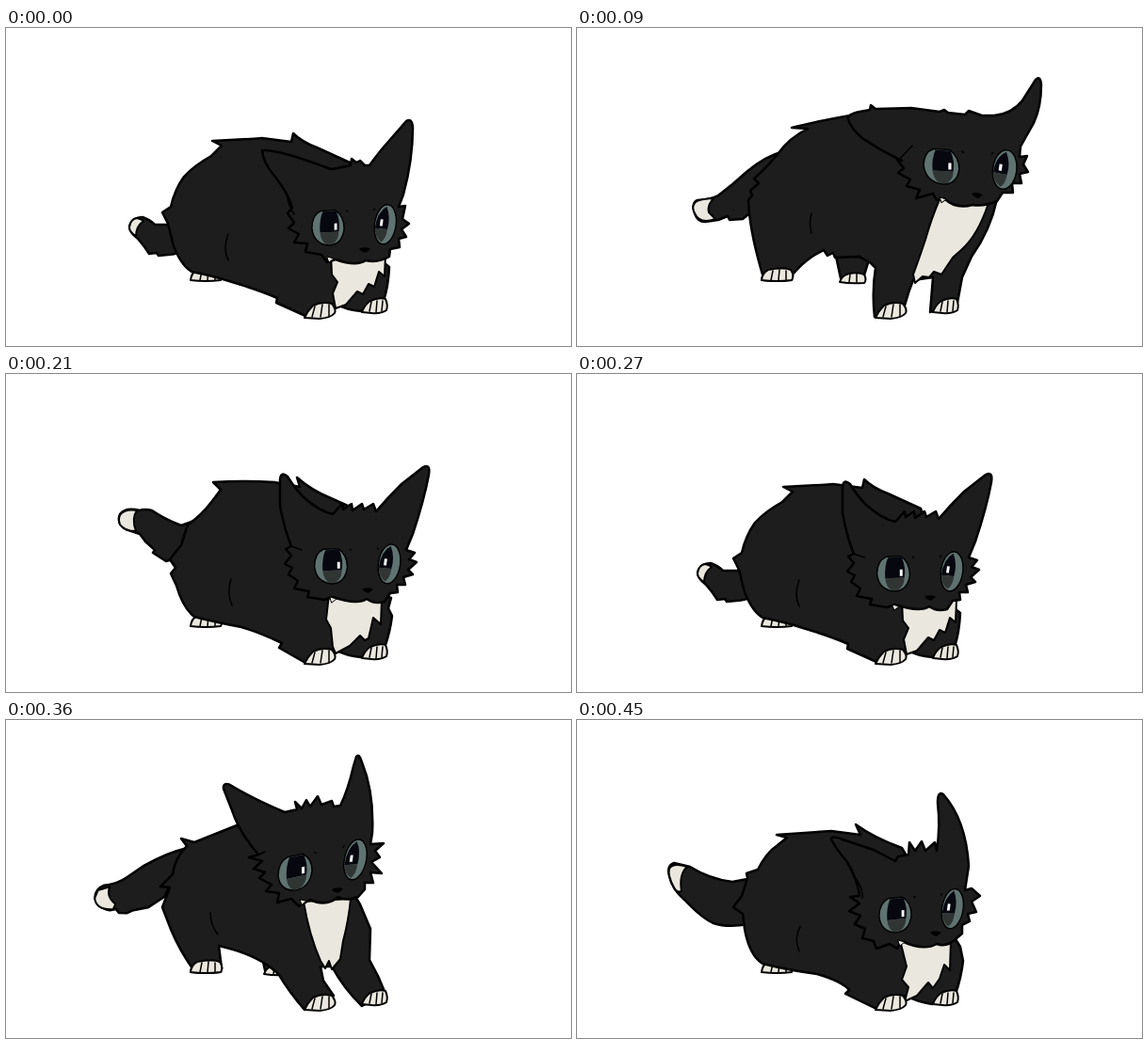
An HTML page without scripts that plays this animation: 600x338 px, repeating every 0.48 s.

```html
<!DOCTYPE html>
<html lang="en">
<head>
<meta charset="utf-8">
<title>Bouncing cat</title>
<style>
html, body { margin: 0; width: 100%; height: 100%; overflow: hidden; background: #fff; }
svg { display: block; width: 100%; height: 100%; }
path { fill: #1d1d1d; stroke: #000; stroke-width: 2.5; stroke-linejoin: round; stroke-linecap: round; }
.white { fill: #eae7df; stroke-width: 2; }
.line { fill: none; stroke-width: 1.5; }
.iris { fill: #5f7370; stroke: #000; stroke-width: 1.5; }
.pupil { fill: #07070f; stroke: none; }
.shade { fill: #303534; stroke: none; }
.pose { visibility: hidden; animation: brief 480ms step-end calc(var(--t) * 1ms - 480ms) infinite; }
.hold { animation-name: hold; }
@keyframes brief { 0% { visibility: visible; } 6.25%, 100% { visibility: hidden; } }
@keyframes hold { 0% { visibility: visible; } 12.5%, 100% { visibility: hidden; } }
</style>
</head>
<body>
<svg viewBox="0 0 600 338">
<defs>
  <g id="face">
    <path class="iris" d="M-18 0Q-18-14-8-18L8-18Q18-11 18 2 16 19 1 19-16 17-18 0Z"/>
    <path class="pupil" d="M-9 5Q-10-8-6-17L9-17Q14-6 12 5Z"/>
    <path class="shade" d="M-9 5H12Q12 14 5 18H-2Q-8 14-9 5Z"/>
    <rect x="7" y="-4" width="3" height="7" fill="#fff"/>
    <g transform="translate(64) rotate(8)">
      <ellipse class="iris" rx="12" ry="21"/>
      <path class="pupil" d="M-11 5Q-11-12-1-19Q5-8 3 5Z"/>
      <path class="shade" d="M-11 5H3Q3 15-2 19Q-10 14-11 5Z"/>
      <rect x="-6" y="-5" width="3" height="7" fill="#fff"/>
    </g>
    <path class="line" d="M21-17l1 1M52-17l-1 1"/>
  </g>
  <g id="muzzle">
    <path class="line" d="M-5-1Q0-3 5-1L1 2Q-2 2-5-1Z" style="fill:#000"/>
    <path class="white" d="M-40 7L-33 9-38 13Z" style="stroke-width:1"/>
  </g>
  <g id="hind">
    <path class="white" d="M196 268Q197 260 203 257 220 254 227 257 231 263 228 268 212 270 196 268Z"/>
    <path class="line" d="M208 258l-2 10M215 257l-1 11M222 258v10"/>
  </g>
  <g id="far">
    <path d="M274 238L280 266H304L312 240Z"/>
    <path class="white" d="M279 270Q281 263 289 261 299 259 305 262 308 268 305 271 290 272 279 270Z"/>
    <path class="line" d="M290 262l-1 8M297 261v9"/>
  </g>
</defs>

<use href="#hind"/>

<!-- crouch, swinging right -->
<g class="pose" style="--t:0">
  <g id="tail0">
    <path d="M190 235Q182 241 172 241L162 242 160 239 152 240Q147 232 140 224 131 217 131 211 134 201 145 201 153 204 158 209L173 209 190 200Z"/>
    <path class="white" d="M131 212Q132 203 139 202 144 203 146 205 138 211 138 221 131 217 131 212Z"/>
  </g>
  <g id="body0">
    <path d="M178 232L172 208 166 196 175 190Q179 172 189 158 200 146 218 136L229 125 219 120Q245 119 272 117L303 121 305 112Q314 121 330 127L365 143 402 250 407 254Q406 275 401 290L377 301Q362 300 349 293L318 306 287 292 288 287Q270 279 240 270 222 264 197 259 186 252 178 232Z"/>
    <path class="line" d="M236 219Q230 234 236 247"/>
    <path class="white" d="M345 240H403L402 264 396 259 391 275 385 272 379 283 373 280 361 294 350 298 347 282 352 270 346 262Z"/>
  </g>
  <g id="head0">
    <path d="M272 130Q290 129 345 150L352 149 366 146 367 139 372 143 376 141 381 146 386 146Q396 132 405 122L425 99Q431 95 432 106 432 140 422 177L417 190 424 189 421 203 428 208 420 214 425 222 417 224 418 233 408 235 407 243Q395 250 382 247 372 254 350 246L341 249 335 241 318 238 320 229 306 228 311 219 300 213 306 207 299 197 304 191Q300 176 285 157 273 143 272 130Z"/>
    <path class="line" d="M298 176Q300 190 306 198"/>
    <use href="#face" transform="translate(342 212) skewY(-3) scale(.95 1)"/>
    <use href="#muzzle" x="381" y="236"/>
  </g>
</g>

<g class="pose hold" style="--t:30">
  <use href="#tail0" transform="rotate(-6 180 215)"/>
  <use href="#body0"/>
  <use href="#head0" x="5" y="2"/>
</g>

<!-- rise to the right -->
<g class="pose" style="--t:90">
  <g id="tail1">
    <path d="M220 131Q200 136 180 153 165 167 150 178 142 182 128 183 121 186 125 197 128 206 136 206L150 204 160 200 162 204 176 203 182 198 194 185Z"/>
    <path class="white" d="M124 188Q125 182 145 181 138 189 140 196L147 203Q130 209 125 197 122 191 124 188Z"/>
  </g>
  <use href="#far"/>
  <path d="M214 133Q225 117 245 107L228 106Q250 100 290 93L440 95 446 182Q439 215 419 243L409 265 404 292 375 302 378 265 357 268Q352 280 348 295L316 307Q313 280 317 255L312 250 300 243 274 244 272 239 266 242 262 236Q243 245 229 262L197 262Q183 215 182 183L186 178 184 173 193 165 188 160Q200 150 214 133Z"/>
  <use href="#hind"/>
  <path class="line" d="M249 197Q246 208 249 218"/>
  <path class="white" d="M386 180L437 186Q426 220 408 236L399 244 387 262 379 259 374 265 367 264 359 271 357 262Q363 246 370 225 376 203 386 180Z"/>
  <path d="M288 97Q286 92 300 89L311 87 312 82 317 86 355 85 385 89 390 87 394 90 412 92 416 88 430 93 443 93Q462 91 473 77L487 55Q492 50 493 60 493 84 485 101L471 126 470 137 478 136 474 145 479 153 470 155 472 165 462 165 463 175 452 175 446 184Q432 190 420 188 402 193 390 181L382 183 378 176 360 181 364 172 350 168 354 161 341 154 347 149 340 140 345 141Q322 130 303 117 291 107 288 97Z"/>
  <path class="line" d="M343 139L356 125"/>
  <use href="#face" transform="translate(387 147) skewY(3) scale(1.05 1)"/>
  <use href="#muzzle" transform="translate(425 178) skewY(8)"/>
</g>

<g class="pose" style="--t:120">
  <use href="#tail1" transform="rotate(9 215 142)"/>
  <use href="#body2"/>
  <use href="#head2" x="3" y="-2"/>
</g>

<g class="pose hold" style="--t:150">
  <g id="tail2">
    <path d="M230 129Q205 126 182 126 158 128 141 141 130 150 126 162L120 174Q118 187 132 187 142 185 150 174L151 167 158 166 165 160Q190 152 214 152Z"/>
    <path class="white" d="M121 171L127 160Q130 153 134 151 130 166 140 175L144 180Q138 187 131 187 117 186 121 171Z"/>
  </g>
  <g id="body2">
    <use href="#far" x="-2"/>
    <path d="M224 128Q231 120 241 114L250 110 234 97Q240 101 253 99 285 94 308 97L314 91 318 97 320 82 330 96 433 186 440 193Q435 217 410 251L401 268 402 292 376 302Q370 290 369 264L352 264Q350 280 348 294L316 307Q306 282 302 254 280 243 256 237 236 247 228 264L198 264Q184 220 184 200L190 193 188 186 197 184 194 172Q205 162 211 145 216 134 224 128Z"/>
    <use href="#hind"/>
    <path class="line" d="M252 193Q249 202 250 207M250 202L251 214"/>
    <path class="white" d="M386 176L437 182Q426 212 408 233L393 250 379 260 373 259 365 268 360 265 354 268 352 264Q364 240 374 212Z"/>
  </g>
  <g id="head2">
    <path d="M317 59Q316 53 323 56 340 60 361 71L386 79 391 71 397 76 402 69 409 76 417 69 423 76 437 74 440 80Q460 71 485 64L507 55Q513 54 510 65 506 82 494 102L475 127 480 126 475 135 480 138 472 147 479 150 470 155 472 163 463 163 464 170 455 170 453 177 444 176 440 182Q430 185 421 181 406 189 391 179L375 178 378 170 362 171 366 163 349 158 356 152 341 148 347 140 339 134 346 128 340 122 345 120Q335 107 327 86Z"/>
    <use href="#face" transform="translate(382 143) skewY(1) scale(1.06 1)"/>
    <use href="#muzzle" transform="translate(422 174) skewY(8)"/>
  </g>
</g>

<!-- drop, then crouch swinging left -->
<g class="pose" style="--t:210">
  <g id="tail3">
    <path d="M200 156L186 161Q168 154 155 145 147 143 142 145 127 141 121 149 117 159 127 165L142 170 148 178 158 187 156 190 170 199 184 195Z"/>
    <path class="white" d="M121 150Q126 143 139 145 133 153 138 167 126 167 121 160 119 154 121 150Z"/>
  </g>
  <g id="body3">
    <path d="M186 182L193 160Q207 151 219 135L228 123 220 115Q250 113 285 115L312 120 309 110Q325 124 345 132L365 141 400 235 409 238 406 249 410 257Q408 274 402 291L377 301Q362 300 349 293L318 307 290 291 293 286Q270 275 250 269 223 264 200 258 188 249 181 225L175 212 180 206 174 197Z"/>
    <path class="line" d="M239 218Q234 232 240 246"/>
    <path class="white" d="M343 234L399 240 398 266 390 259 385 281 381 283 376 278 365 289 350 297 347 290 345 270 340 261Z"/>
  </g>
  <g id="head3">
    <path d="M291 112Q292 103 299 109 307 122 316 131 333 146 347 149L357 138 358 144 367 138 368 145 378 138 380 144 390 138 393 146Q405 132 420 117L443 99Q451 95 449 107 444 134 432 170L425 187 434 190 428 197 436 200 427 208 432 213 422 216 424 224 415 224 416 232 408 233 402 242Q391 245 383 239 373 246 347 237L338 240 320 237 322 231 306 228 310 220 300 213 304 206 296 202 303 193 297 186 303 183Q296 167 291 140Z"/>
    <path class="line" d="M303 183L314 187"/>
    <use href="#face" transform="translate(345 204) skewY(-2) scale(.97 1)"/>
    <use href="#muzzle" x="384" y="230"/>
  </g>
</g>

<g class="pose" style="--t:240">
  <use href="#tail3" transform="rotate(-28 184 182)"/>
  <use href="#body3"/>
  <use href="#head3" x="-4" y="7"/>
</g>

<g class="pose hold" style="--t:270">
  <use href="#tail0" x="-3"/>
  <use href="#body0"/>
  <use href="#head3" x="-9" y="8"/>
</g>

<!-- rise to the left -->
<g class="pose" style="--t:330">
  <g id="tail4">
    <path d="M188 134Q170 144 150 164L136 181Q128 191 115 196 107 202 109 211 114 221 128 220L134 217 138 220 146 218 152 213 166 206 180 190Z"/>
    <path class="white" d="M110 203L121 196Q120 207 132 212L131 218Q114 224 109 212Z"/>
  </g>
  <use href="#far" x="-4"/>
  <path d="M168 180Q171 163 181 147L195 132 184 129 205 122 235 112 365 190 374 195 386 225 383 230 387 237 385 243Q387 260 395 272L403 291 376 304 361 280 349 260 334 262 337 277 347 293 316 308Q300 284 286 265L272 253 253 245 241 247 239 242 232 243 229 237 219 236Q218 250 230 264H198Q171 225 168 203Z"/>
  <use href="#hind"/>
  <path class="line" d="M210 200Q211 210 217 215"/>
  <path class="white" d="M316 198L365 192Q364 213 359 236L356 258 350 251 344 264 340 251 336 260 331 248 326 246Q319 232 317 205Z"/>
  <path d="M216 102Q216 97 226 97 250 101 268 99L274 96 290 98 300 94 315 100 316 95 325 97 332 94 340 97 343 94 355 96 362 89Q380 78 413 72 419 72 414 81L404 97Q396 112 394 140L400 138 395 147 406 149 397 158 402 165 391 168 394 177 385 177 384 186Q376 199 356 196 341 206 326 197L320 205 310 198 306 210 300 200 290 207 292 195 283 199 285 188 274 182 280 175 272 168 277 163Q260 157 247 141L232 121Q224 109 216 102Z"/>
  <path class="line" d="M268 160L278 157"/>
  <use href="#face" transform="translate(311 167) skewY(-12)"/>
  <use href="#muzzle" transform="translate(354 188) skewY(-6)"/>
</g>

<g class="pose" style="--t:360">
  <use href="#tail4" transform="rotate(16 182 148)"/>
  <use href="#body5"/>
  <use href="#head5" x="1" y="-2"/>
</g>

<g class="pose hold" style="--t:390">
  <g id="tail5">
    <path d="M196 134Q182 129 165 133 148 127 130 128 110 130 99 136 80 149 76 165 78 178 98 178 109 174 122 163L124 167 145 161 147 164 165 161 184 165Z"/>
    <path class="white" d="M76 165Q79 150 90 142 89 154 97 162L110 169Q104 177 92 178 77 176 76 165Z"/>
  </g>
  <g id="body5">
    <use href="#far" x="-5"/>
    <path d="M192 134L186 126 200 130 220 122 245 112 370 186 376 196 387 222 386 255 395 272 403 291 378 304Q359 286 346 262L334 262 337 277 348 293 317 308Q300 288 290 271 270 250 226 240L229 264H198Q181 240 171 212L166 199 174 178 164 177 177 164Q179 147 192 134Z"/>
    <use href="#hind"/>
    <path class="line" d="M217 205Q217 218 225 228"/>
    <path class="white" d="M316 193L366 190Q364 212 358 235L355 254 346 265 343 256 339 264 334 256Q322 229 316 193Z"/>
  </g>
  <g id="head5">
    <path d="M230 75Q229 68 237 71 260 85 295 100L308 97 306 89 313 96 318 87 322 94 330 83 334 92 345 88 347 94 354 93Q362 77 368 51L371 41Q374 37 377 47 390 79 388 122L386 134 400 133 391 141 396 148 387 153 398 165 386 164 389 175 380 175 380 182 373 190Q360 195 352 190 339 201 322 193L310 200 302 192 287 196 289 186 275 184 281 177 268 170 274 164 262 160 271 152 257 148 267 145Q247 122 239 98Z"/>
    <path class="line" d="M266 146L274 142"/>
    <use href="#face" transform="translate(306 164) skewY(-12)"/>
    <use href="#muzzle" transform="translate(351 183) skewY(-4)"/>
  </g>
</g>

<!-- drop back into the first crouch -->
<g class="pose" style="--t:450">
  <path d="M186 168L165 172Q141 169 120 156 112 154 103 152 95 155 98 166 101 180 114 191 133 211 145 216 160 221 182 217Z"/>
  <path class="white" d="M98 158Q102 151 117 156 108 164 111 182 106 184 103 178 96 165 98 158Z"/>
  <path d="M178 222L176 206 166 199 175 187 181 168 180 163 192 159Q201 141 213 133L223 125 212 122Q240 120 270 118L301 122 296 111Q315 125 345 136L402 233 407 241 410 256Q408 274 402 291L377 302Q362 300 349 293L318 307 285 291 289 287Q282 278 255 270 225 266 197 259 183 250 178 222Z"/>
  <path class="line" d="M237 220Q230 232 236 246"/>
  <path class="white" d="M343 234L397 233 396 266 390 260 385 275 378 285 373 279 361 293 348 299 352 284 345 276 350 262Z"/>
  <path d="M270 127Q270 122 282 127L315 138 338 150 341 145 352 143 353 130 359 139 366 129 370 139 380 130 382 139Q386 113 383 88 383 75 389 79 413 106 416 155L412 181 419 179 428 187 419 193 424 204 415 206 417 214 409 218 409 227 403 232Q393 242 382 238 368 246 345 235L340 243 332 238 318 243 315 235 303 232 306 222 295 217 301 208 289 203 300 195 290 188 300 187Q298 170 287 151 275 137 270 127Z"/>
  <path class="line" d="M297 170Q304 180 303 189"/>
  <use href="#face" transform="translate(338 207) skewY(-6) scale(.95 1)"/>
  <use href="#muzzle" x="381" y="227"/>
</g>

<!-- front paws -->
<path class="white" d="M317 308Q320 301 326 295 336 290 346 293 351 299 349 303 345 308 333 309Z"/>
<path class="line" d="M328 296l-3 11M336 294l-2 13M343 294v12"/>
<path class="white" d="M378 302Q381 294 387 290 396 286 403 288 406 295 404 300 398 304 388 303Z"/>
<path class="line" d="M388 291l-2 10M394 290l-1 12M400 290l-1 11"/>
</svg>
</body>
</html>
```
